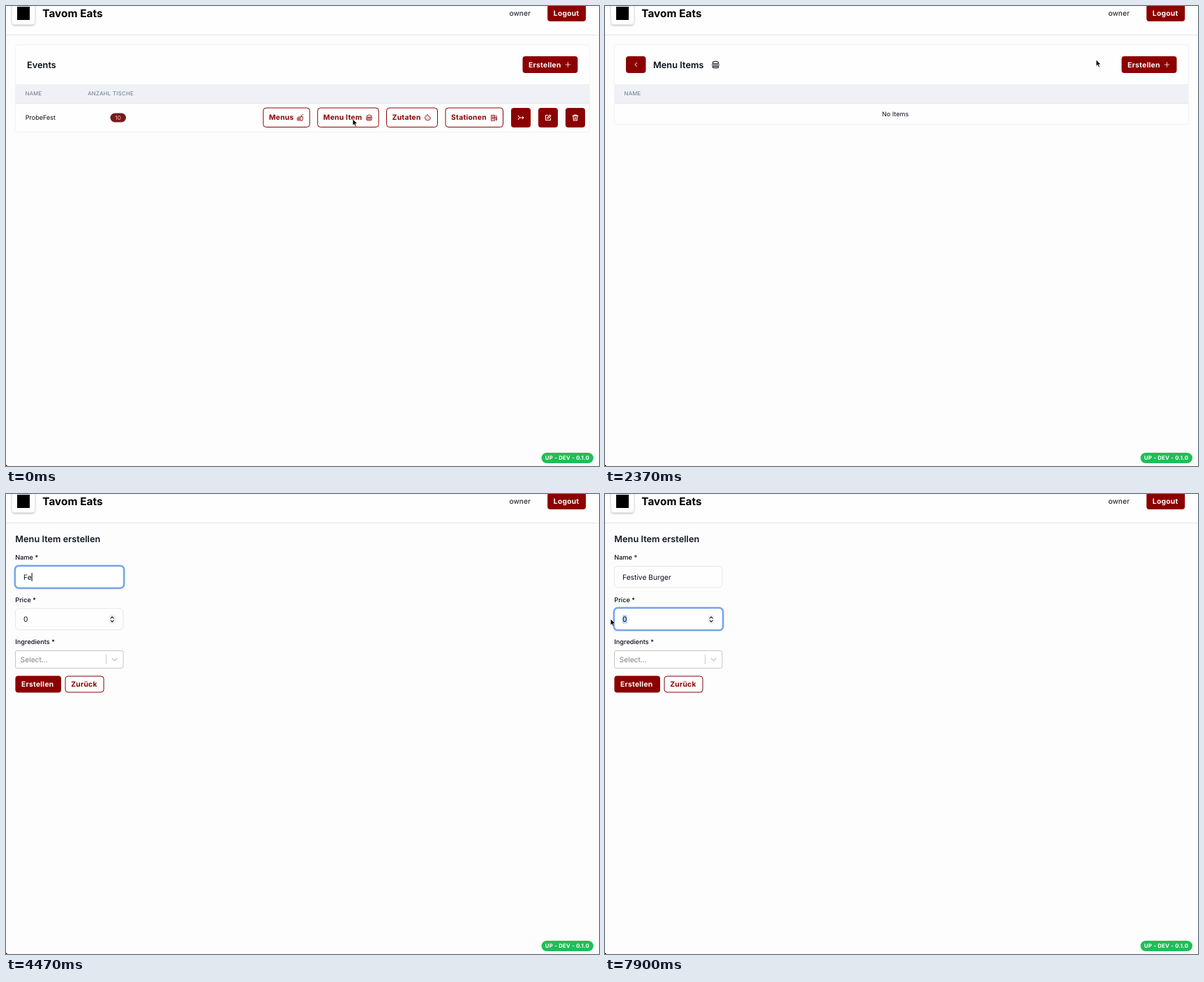
An HTML page that plays this animation: 850x659 px, repeating every 8000 ms.

```html
<!DOCTYPE html>
<html lang="de">
<head>
<meta charset="utf-8">
<title>Menu items</title>
<style>
html, body { margin: 0; width: 100%; height: 100%; overflow: hidden; background: #fdfdfd; }
svg { display: block; width: 850px; height: 659px; }
text { font-family: Inter, sans-serif; font-optical-sizing: none; white-space: pre; text-rendering: geometricPrecision; }
</style>
</head>
<body>
<svg id="stage" viewBox="0 0 850 659"></svg>
<script>
const RED = '#8b0000', INK = '#0b0f19', LINE = '#e5e7eb';
const LOOP = 8000, ITEMS_AT = 1400, FORM_AT = 2900, NAME_FOCUS = 3800, PRICE_FOCUS = 7560;
const NAME = 'Festive Burger';
const KEY_TIMES = [4330, 4470, 4620, 4780, 4970, 5100, 5270, 5630, 5900, 6000, 6090, 6300, 6380, 6470];

const text = (x, y, str, size, weight = 400, fill = INK, extra = '') =>
  `<text x="${x}" y="${y}" font-size="${size}" font-weight="${weight}" fill="${fill}" ${extra}>${str}</text>`;
const rect = (x, y, w, h, r, fill, stroke = 'none', extra = '') =>
  `<rect x="${x}" y="${y}" width="${w}" height="${h}" rx="${r}" fill="${fill}" stroke="${stroke}" ${extra}/>`;
const line = (d, stroke, width = 1) =>
  `<path d="${d}" fill="none" stroke="${stroke}" stroke-width="${width}" stroke-linecap="round" stroke-linejoin="round"/>`;

const ICONS = {
  plus: 'M12 3v18M3 12h18',
  back: 'M14.5 6l-6 6 6 6',
  meal: 'M12 9h9l-1 12h-6M16 9l1-5 4-2M3 13.5q0-4 5-4t5 4zM2 17h12M3 21h10',
  burger: 'M3.500 9q0-6 8.500-6t8.500 6zM2 13h20M3.500 17h17q0 4-3 4h-11q-3 0-3-4z',
  cookie: 'M12 3a9 9 0 1 0 9 9q-4 0-4-4-5 0-5-5zM8.500 9v.1M8 15v.1M13 13v.1M14 17v.1',
  pump: 'M3 21V4h11v17zM14 10h4v10h3V8l-3-4M7 8v9M10.500 8v9',
  merge: 'M3 6l6 6h12M3 18l6-6M17 8l4 4-4 4',
  edit: 'M11 4H4v16h16v-7M9 15l1-4 8-8 3 3-8 8z',
  trash: 'M3 6h18M8 6V3h8v3M5 6l1 15h12l1-15M10 11v6M14 11v6'
};
const icon = (name, cx, cy, size, color, width = 2) =>
  `<g transform="translate(${cx - size / 2} ${cy - size / 2}) scale(${size / 24})">${line(ICONS[name], color, width)}</g>`;

const label = (x, y, str, color) => text(x, y, str, 10.3, 700, color, 'letter-spacing=".26"');
const solid = (x, y, w, h, str = '', id = '') =>
  rect(x, y, w, h, 4, RED, 'none', id) + label(x + 8.6, y + h / 2 + 3.7, str, '#fff');
const outline = (x, y, w, h, str, id = '') =>
  rect(x + .5, y + .5, w - 1, h - 1, 4, '#fff', RED, id) + label(x + 8.6, y + h / 2 + 3.7, str, RED);
const createButton = id => solid(740.5, 72, 79, 24, 'Erstellen', id) + icon('plus', 805.5, 84, 9, '#fff');
const column = (x, str) => text(x, 128.1, str, 7.75, 400, '#64748b', 'letter-spacing=".3"');
const card = bottom =>
  rect(13.5, 55.5, 823, bottom - 55, 4, '#fefefe', '#f1f2f4') +
  rect(14, 112, 822, 27, 0, '#eff1f6') + line('M14 139.500H836', LINE);

const frame =
  rect(0, 0, 850, 41, 0, '#fefefe') + line('M0 41.500H850', '#e4e5e8') +
  rect(8.5, -8, 33, 34.5, 4, '#fff', '#e8e8ea', 'filter="url(#soft)"') +
  rect(16, 1, 18, 19, 0, '#000') +
  text(52.3, 16.2, 'Tavom Eats', 15.4, 700, '#000') +
  text(721.5, 14.2, 'owner', 10.25) + solid(776.2, -2, 55, 24, 'Logout') +
  rect(767.5, 640, 74.5, 15, 7.5, '#21bd58') +
  text(772.8, 650.1, 'UP - DEV - 0.1.0', 7.8, 700, '#fff', 'letter-spacing=".25"') +
  '<path d="M0 657v2h2z"/>';

const rowButtons = [
  [368.3, 67.5, 'Menus', 'meal', 421.5], [446.2, 88.5, 'Menu Item', 'burger', 520.5],
  [545, 74, 'Zutaten', 'cookie', 604.5], [629.5, 83.500, 'Stationen', 'pump', 699.5]
];
const events = card(180) + text(30, 88.6, 'Events', 12.8, 600) + createButton('') +
  column(27.5, 'NAME') + column(117.2, 'ANZAHL TISCHE') +
  text(27.8, 163.2, 'ProbeFest', 9.05) + rect(149.5, 153.5, 22.5, 13, 6.5, '#761a1a') +
  text(160.7, 162.9, '10', 8, 400, '#f0c9c9', 'text-anchor="middle"') +
  rowButtons.map(([x, w, str, glyph, cx]) =>
    outline(x, 145.5, w, 28.5, str, str === 'Menu Item' ? 'id="itemButton"' : '') + icon(glyph, cx, 160, 10.5, RED)).join('') +
  ['merge', 'edit', 'trash'].map((glyph, i) =>
    solid(724 + 39 * i, 146, 28, 28) + icon(glyph, 738 + 39 * i, 160, 10.5, '#fff', 2.3)).join('');

const items = card(169) + solid(30, 72, 28.5, 24) + icon('back', 44.5, 84, 11.5, '#fff') +
  text(69, 88.6, 'Menu Items', 12.8, 600) + icon('burger', 158.5, 84, 12.5, INK) +
  createButton('id="createButton"') + column(27.5, 'NAME') + text(397, 157.8, 'No Items', 9.05);

const field = y => rect(13.5, y, 154.5, 30.5, 5, '#fefefe', LINE);
const form = text(13.3, 69.2, 'Menu Item erstellen', 12.75, 600, '#111827') +
  ['Name *', 'Price *', 'Ingredients *'].map((str, i) => text(13.3, 94.4 + 60.4 * i, str, 9.2, 500)).join('') +
  field(103.5) + field(164) +
  `<g id="ring">${rect(12.8, 0, 156.4, 32, 5.5, '#fff', '#b9d2f7', 'stroke-width="3.2"')}` +
  `${rect(12.8, 0, 156.4, 32, 5.5, 'none', '#6f9fe6', 'stroke-width="1.8"')}</g>` +
  rect(25, 173.5, 6.6, 12, 0, '#b3d0f7', 'none', 'id="selection"') +
  text(25, 122.8, '', 10.25, 400, INK, 'id="typed"') + rect(0, 113, 1, 12, 0, '#000', 'none', 'id="caret"') +
  text(25, 183.2, '0', 10.25) +
  rect(148, 173.3, 8.5, 12.5, 3, '#f3f3f3', '#e4e4e4', 'stroke-width=".6"') +
  line('M150.200 178l2-2.100 2 2.100M150.200 181.200l2 2.100 2-2.100', '#222', 1.1) +
  rect(13.5, 224.5, 154.5, 25, 2.5, '#fff', '#c4c4c4') +
  text(20.6, 240.8, 'Select...', 10.25, 400, '#808080') +
  line('M143.500 230.500V243.500', '#ccc') + line('M152.200 235.500l3.400 3.400 3.400-3.400', '#c4c4c4', 1.3) +
  solid(13.4, 260.5, 65.6, 24, 'Erstellen') + outline(84.6, 260.5, 56, 24, 'Zurück');

const pointers =
  '<path id="arrow" d="M0 0v9.200l2.100-2 1.500 3.500 1.700-.7-1.500-3.400h3z" fill="#000" stroke="#fff" stroke-width=".7"/>' +
  '<path id="hand" d="M-.3 1q.9-1.400 1.800 0v4q1-1 1.600.1 1-.8 1.600.2 1.300-.6 1.500.7v2.500q-.3 2-1 3.300h-4.400q-1.400-2.400-3.700-4.600 0-1.500 1.500-.9l1.100 1z" fill="#fff" stroke="#000" stroke-width=".9"/>' +
  '<g id="beam">' + line('M-2-5q2 0 2 1.200v7.600q0 1.200-2 1.200M2-5q-2 0-2 1.200M2 5q-2 0-2-1.200M-1 1h2', '#111') + '</g>';

const stage = document.getElementById('stage');
stage.innerHTML = '<defs><filter id="soft" x="-30%" y="-30%" width="160%" height="170%">' +
  '<feDropShadow dx="0" dy="1.300" stdDeviation="1.300" flood-opacity=".22"/></filter></defs>' + frame +
  `<g id="events">${events}</g><g id="items">${items}</g><g id="form">${form}</g><g id="cursor">${pointers}</g>`;

const $ = id => document.getElementById(id);
const show = (id, on) => { $(id).style.display = on ? '' : 'none'; };
const hover = (id, on) => on ? $(id).setAttribute('filter', 'url(#soft)') : $(id).removeAttribute('filter');

const EASE = {
  go: u => u ** 1.4,
  stop: u => 1 - (1 - u) ** 2,
  both: u => u * u * (3 - 2 * u)
};
// time, x, y, easing towards this point
const PATH = [
  [0, 497, 162, 'both'], [500, 497, 162, 'both'], [650, 497.5, 163, 'both'], [1870, 497.5, 163, 'both'],
  [2370, 703.5, 77, 'go'], [2640, 774, 83, 'stop'], [2850, 774, 83, 'both'],
  [3530, 67, 132, 'both'], [3800, 67, 130, 'both'], [6970, 67, 130, 'both'],
  [7070, 67.5, 137, 'both'], [7480, 36, 179, 'both'], [7560, 34, 179, 'both'],
  [7870, 8, 179, 'both'], [LOOP, 8, 179, 'both']
];

function cursorAt(t) {
  const i = PATH.findIndex(p => p[0] > t);
  const [t0, x0, y0] = PATH[i - 1], [t1, x1, y1, ease] = PATH[i];
  const u = EASE[ease]((t - t0) / (t1 - t0));
  return [x0 + (x1 - x0) * u, y0 + (y1 - y0) * u];
}

function pointerAt(t, x, y) {
  if (t < ITEMS_AT) return t >= 500 ? 'hand' : 'arrow';
  if (t < FORM_AT) return x > 740 ? 'hand' : 'arrow';
  const inField = x > 13 && x < 168 && (y > 103 && y < 134 || y > 164 && y < 195);
  return inField ? 'beam' : 'arrow';
}

function draw(t) {
  show('events', t < ITEMS_AT);
  show('items', t >= ITEMS_AT && t < FORM_AT);
  show('form', t >= FORM_AT);

  const [x, y] = cursorAt(t), pointer = pointerAt(t, x, y);
  $('cursor').setAttribute('transform', `translate(${x} ${y})`);
  show('cursor', t < KEY_TIMES[0] || t >= 6970);
  for (const id of ['arrow', 'hand', 'beam']) show(id, id === pointer);
  hover('itemButton', t >= 500);
  hover('createButton', pointer === 'hand');

  const inPrice = t >= PRICE_FOCUS;
  show('ring', t >= NAME_FOCUS);
  $('ring').setAttribute('transform', `translate(0 ${inPrice ? 163.2 : 102.8})`);
  show('selection', inPrice && x < 26);
  $('typed').textContent = NAME.slice(0, KEY_TIMES.filter(k => k <= t).length);
  show('caret', t >= NAME_FOCUS && !inPrice);
  $('caret').setAttribute('x', 25 + $('typed').getComputedTextLength());
}

function tick() {
  draw(performance.now() % LOOP);
  requestAnimationFrame(tick);
}
tick();
</script>
</body>
</html>
```
